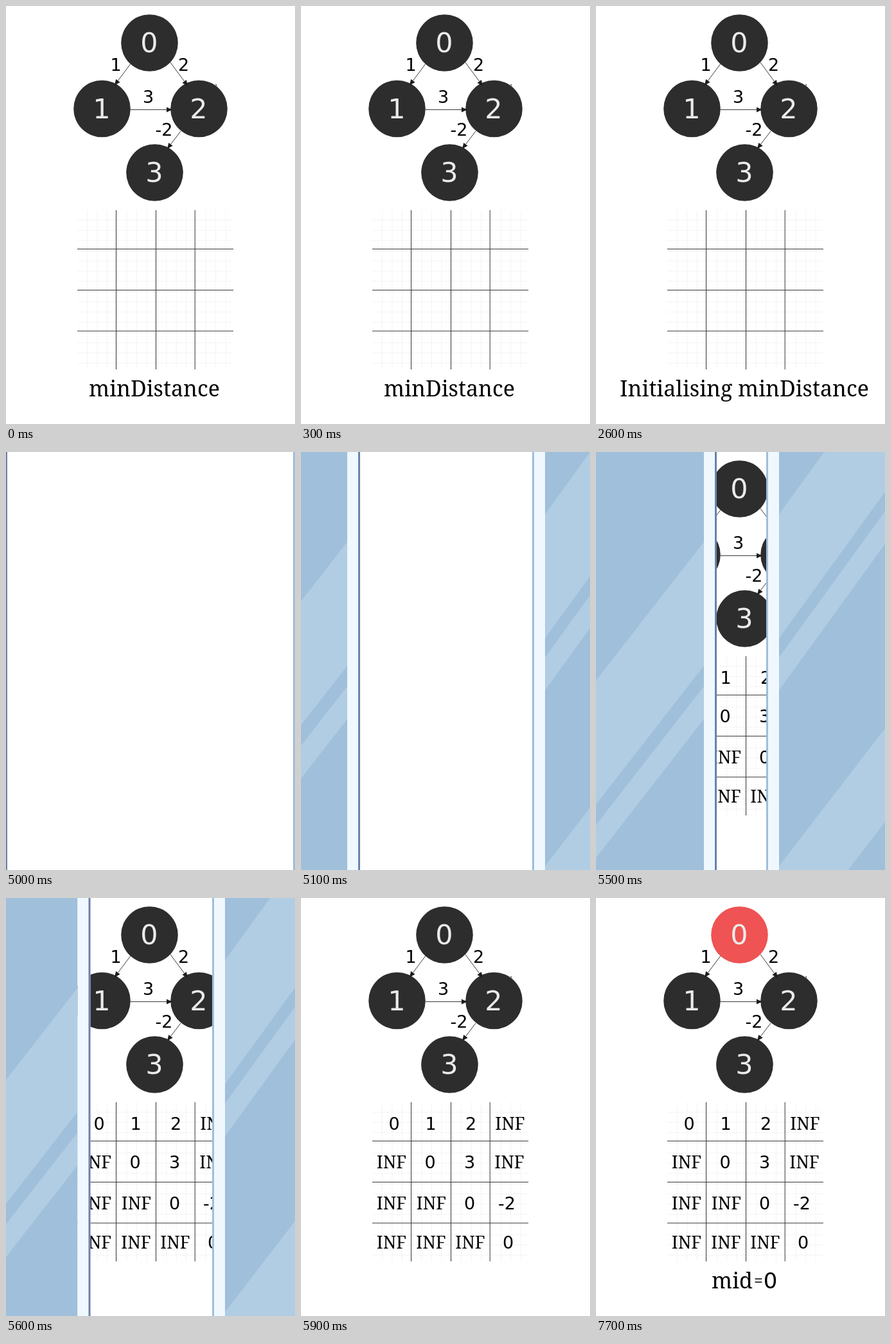
These frames come from a looping animation (450x651 px, 8 s). An HTML page:

```html
<!DOCTYPE html>
<html lang="en">
<head>
<meta charset="utf-8">
<title>Minimum distance walkthrough</title>
<style>
  html, body { margin: 0; width: 100%; height: 100%; overflow: hidden; background: #fff; }
  svg { display: block; width: 100%; height: 100%; }
  text { text-anchor: middle; fill: #000; }
  .slab { font-family: "Noto Serif", serif; }
  .num { font-family: "DejaVu Sans", sans-serif; }
  .title { font-size: 34px; }
  .cell { font-size: 27px; }
  .node { font-size: 43px; fill: #ebebeb; }
  .rule { stroke: #3a3a3a; stroke-width: 1; fill: none; }
  .paper { stroke: #f4f4f4; stroke-width: 1; fill: none; }
</style>
</head>
<body>
<svg id="stage" viewBox="0 0 450 651" preserveAspectRatio="none">
  <g id="scene">
    <g id="graph"></g>
    <g id="grid"></g>
    <g id="values"></g>
    <g id="short"></g>
    <g id="long"></g>
    <g id="mid"></g>
  </g>
  <g id="doors">
    <g id="left"></g>
    <g id="right"></g>
  </g>
</svg>
<script>
const NS = 'http://www.w3.org/2000/svg';
const $ = id => document.getElementById(id);

function add(parent, tag, attrs, content) {
  const el = document.createElementNS(NS, tag);
  for (const key in attrs) el.setAttribute(key, attrs[key]);
  if (content !== undefined) el.textContent = content;
  parent.appendChild(el);
  return el;
}
const label = (parent, s, x, y, cls) => add(parent, 'text', { x, y, class: cls }, s);
const path = (parent, d, cls) => add(parent, 'path', { d, class: cls });

// Graph
const graph = $('graph');

function arrow(x1, y1, x2, y2) {
  const a = Math.atan2(y2 - y1, x2 - x1);
  const ux = Math.cos(a), uy = Math.sin(a);
  const bx = x2 - 9 * ux, by = y2 - 9 * uy;
  path(graph, `M${x1} ${y1}L${bx} ${by}`, 'rule');
  add(graph, 'path', {
    d: `M${x2} ${y2}L${bx - 4 * uy} ${by + 4 * ux}L${bx + 4 * uy} ${by - 4 * ux}Z`,
    fill: '#1c1c1c'
  });
}

const nodes = [[223.5, 57.5], [149.5, 160], [300.5, 160], [231.5, 259.5]].map(([cx, cy], i) => {
  const disc = add(graph, 'circle', { cx, cy, r: 44.3, fill: '#2d2d2d' });
  label(graph, i, cx - 0.5, cy + 14.5, 'num node');
  return disc;
});

[[194, 90, 169, 123.5], [256, 88, 283, 124.5], [194, 161.5, 259, 161.5], [272, 195, 251, 222.5]]
  .forEach(e => arrow(...e));
[['1', 171, 100.5], ['2', 276.5, 100.5], ['3', 221.5, 150.5], ['-2', 246, 201.5]]
  .forEach(([s, x, y]) => label(graph, s, x, y, 'num cell'));
path(graph, 'M326 122.5h1.5v2', 'rule');

// Table
const grid = $('grid');
let fine = '';
for (let x = 126.5; x < 354; x += 15.4) fine += `M${x} 318V566`;
for (let y = 333.5; y < 566; y += 15.9) fine += `M111 ${y}H354`;
path(grid, fine, 'paper');
path(grid, 'M171.5 318V566M233.5 318V566M294.2 318V566', 'rule');
path(grid, 'M111 378.5H354M111 442.5H354M111 506.2H354', 'rule');

[
  [361, '0', 145, '1', 202, '2', 264.5, 'INF', 325.5],
  [421, 'INF', 141, '0', 201, '3', 262.5, 'INF', 324.5],
  [484.5, 'INF', 141, 'INF', 203, '0', 262.5, '-2', 320.5],
  [545.5, 'INF', 141, 'INF', 202.5, 'INF', 263.5, '0', 322.5]
].forEach(([y, ...row]) => {
  for (let i = 0; i < row.length; i += 2)
    label($('values'), row[i], row[i + 1], y, (row[i] === 'INF' ? 'slab' : 'num') + ' cell');
});

// Captions
label($('short'), 'minDistance', 231, 608, 'slab title');
label($('long'), 'Initialising minDistance', 231, 608, 'slab title');
label($('mid'), 'mid', 212, 608, 'slab title');
label($('mid'), '=', 253, 605, 'slab').setAttribute('font-size', 25);
label($('mid'), '0', 271.5, 608, 'num title');

// Doors: local x = 0 is the meeting edge, panes begin 20 px away from it
const shape = (parent, d, fill) => add(parent, 'path', { d, fill });

function door(parent, dir, lineColour, slope, bands) {
  const near = 20 * dir, far = 470 * dir;
  const drop = -450 * dir * slope;
  shape(parent, `M${near} 0H${far}V651H${near}Z`, '#a0bfda');
  for (const [top, bottom] of bands)
    shape(parent, `M${near} ${top}L${far} ${top + drop}V${bottom + drop}L${near} ${bottom}Z`, '#b0cde3');
  shape(parent, `M0 0H${near}V651H0Z`, '#f0f8ff');
  shape(parent, `M0 0H${3 * dir}V651H0Z`, lineColour);
}
door($('left'), -1, '#6c81ac', 1.285, [[140, 333], [365, 416]]);
door($('right'), 1, '#a0bedb', 1.38, [[97, 290], [320, 371]]);
shape($('right'), 'M20 645L470 60V205L20 791Z', '#b0cde3');
$('right').appendChild($('right').children[3 + 1 - 1]);
shape($('right'), 'M0 0H20V651H0Z', '#f0f8ff');
shape($('right'), 'M0 0H3V651H0Z', '#a0bedb');

// Timing
const LOOP = 8000, STEP = 100;
const clamp = v => Math.max(0, Math.min(1, v));
const leftKeys = [[5000, 2], [5100, 92], [5200, 203], [5300, 226], [5400, 223], [5500, 188], [5600, 131.5], [5700, 56], [5800, 2]];
const rightKeys = [[5000, 447], [5100, 360], [5200, 251], [5300, 227], [5400, 230], [5500, 265], [5600, 321], [5700, 397], [5800, 447]];

function at(keys, t) {
  const i = Math.max(1, keys.findIndex(k => k[0] >= t));
  const [t0, a] = keys[i - 1], [t1, b] = keys[i];
  return a + (b - a) * clamp((t - t0) / (t1 - t0));
}
const mix = (a, b, k) => `rgb(${a.map((v, i) => Math.round(v + (b[i] - v) * k))})`;
const show = (id, k) => $(id).setAttribute('opacity', k);

function draw(t) {
  const swapped = t >= 5300;
  const turn = clamp((t - 2400) / 200);
  const pick = clamp((t - 7400) / 300);
  const moving = t >= 5000 && t < 5900;

  show('scene', t >= 5000 && !swapped ? 0 : 1);
  show('values', swapped ? 1 : 0);
  show('short', swapped ? 0 : 1 - turn);
  show('long', swapped ? 0 : turn);
  show('mid', pick);
  nodes[0].setAttribute('fill', mix([45, 45, 45], [239, 83, 83], pick));

  show('doors', moving ? 1 : 0);
  if (moving) {
    $('left').setAttribute('transform', `translate(${at(leftKeys, t)})`);
    $('right').setAttribute('transform', `translate(${at(rightKeys, t)})`);
  }
}

const start = performance.now();
function tick() {
  const t = (performance.now() - start) % LOOP;
  draw(Math.floor(t / STEP) * STEP);
  requestAnimationFrame(tick);
}
tick();
</script>
</body>
</html>
```
